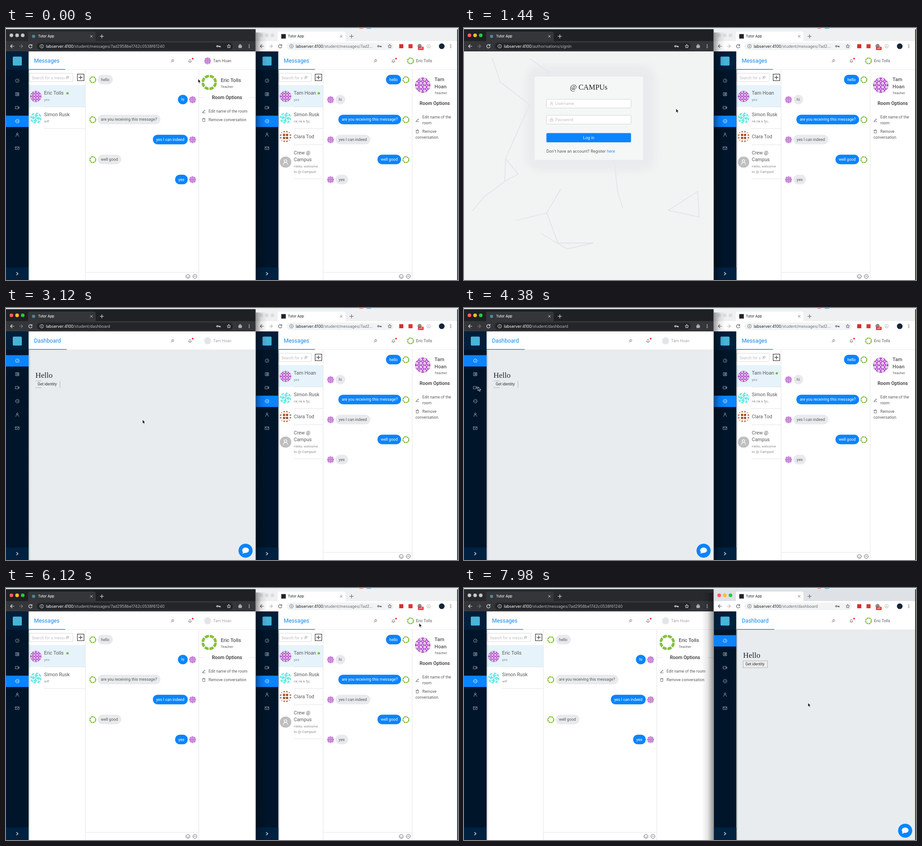
Animation, 1000 px wide and 560 px high, one loop 8 s. Source, as an HTML page:

```html
<!DOCTYPE html>
<html lang="en">
<head>
<meta charset="utf-8">
<title>Chat demo</title>
<style>
html, body { margin: 0; width: 100%; height: 100%; overflow: hidden; background: #fff; }
svg { display: block; font-family: Roboto, sans-serif; }
text { white-space: pre; }
.ui { font-family: Inter, sans-serif; }
.serif { font-family: "Liberation Serif", serif; }
</style>
</head>
<body>
<svg id="stage" width="1000" height="560" viewBox="0 0 1000 560"></svg>
<script>
const LOOP = 8000, STEP = 60, RIGHT = 552.5, BLUE = '#0a84ff';
const ME = 'Tam Hoan', PEER = 'Eric Tolls', HOST = 'labserver:4100';

// Page changes and window focus
const OUT_L = 780, IN_L = 2640, CHAT_L = 5700, OUT_R = 6600, IN_R = 7620;
const FOCUS_L = 480, FOCUS_R = 6300;

const ICONS = {
  dash: 'M-3 3A4 4 0 1 1 3 3ZM0 .8L1.5-1.3',
  list: 'M-3.5-3.5H3.5V3.5H-3.5ZM-1.5-1.5H2M-1.5 0H2M-1.5 1.5H2',
  video: 'M-4-2.7H2V2.7H-4ZM2-.5L4-2V2L2 .5',
  chat: 'M-4 0A4 4 0 1 1 4 0 4 4 0 1 1-4 0M-2.2 0h.8M-.4 0h.8M1.4 0h.8',
  user: 'M-1.9-1.8A1.9 1.9 0 1 1 1.9-1.8 1.9 1.9 0 1 1-1.9-1.8M-3.3 4C-3-.8 3-.8 3.3 4',
  mail: 'M-4-3H4V3H-4ZM-4-2.5L0 .8 4-2.5',
  search: 'M-1.2-.8A2.2 2.2 0 1 1 3.2-.8 2.2 2.2 0 1 1-1.2-.8M-.6 1L-3 3.2',
  bell: 'M-3 2.2C-2 1.5-2.2-3 0-3S2 1.5 3 2.2ZM-.8 3.6H.8',
  pen: 'M-3.5 3.7H3.5M-2.5 1.8L2-3 3.2-1.8-1.2 2Z',
  trash: 'M-3.2-2.5H3.2M-2.4-2.5V3.5H2.4V-2.5M-1.2-2.5V-3.6H1.2V-2.5',
  lock: 'M-3-.5H3V3.5H-3ZM-1.8-.5V-2A1.8 1.8 0 0 1 1.8-2V-.5M0 1v1',
  back: 'M4 0H-3.5M0-3.5L-3.5 0 0 3.5',
  next: 'M-4 0H3.5M0-3.5L3.5 0 0 3.5',
  reload: 'M3-2A3.7 3.7 0 1 0 3.6 1M3.6-4V-1.5H1',
  info: 'M-4 0A4 4 0 1 1 4 0 4 4 0 1 1-4 0M0-.5V2M0-2v.5',
  key: 'M-4 0A1.6 1.6 0 1 1-.8 0 1.6 1.6 0 1 1-4 0M-.8 0H4V2M2.2 0V1.6',
  star: 'M0-4L1.2-1.3 4-1 1.9.9 2.5 3.8 0 2.3-2.5 3.8-1.9.9-4-1-1.2-1.3Z',
  hat: 'M-4-.3H4M-2.3-.8L-1.5-3.5H1.5L2.3-.8ZM-3 2.2A1.2 1.2 0 1 1-.6 2.2 1.2 1.2 0 1 1-3 2.2M.6 2.2A1.2 1.2 0 1 1 3 2.2 1.2 1.2 0 1 1 .6 2.2',
  dots: 'M0-3v.1M0 0v.1M0 3v.1',
  chev: 'M-1.8-3L1.8 0-1.8 3',
  cross: 'M-2.3-2.3L2.3 2.3M2.3-2.3L-2.3 2.3',
  plus: 'M-4 0H4M0-4V4',
  smile: 'M-4.5 0A4.5 4.5 0 1 1 4.5 0 4.5 4.5 0 1 1-4.5 0M-2.3 1C-1.5 3 1.5 3 2.3 1M-1.7-1.5v.3M1.7-1.5v.3',
  up: 'M-4.5 0A4.5 4.5 0 1 1 4.5 0 4.5 4.5 0 1 1-4.5 0M-2.2 1L0-1.3 2.2 1'
};

const rect = (x, y, w, h, fill, more = '') => `<rect x="${x}" y="${y}" width="${w}" height="${h}" fill="${fill}" ${more}/>`;
const circle = (x, y, r, fill, more = '') => `<circle cx="${x}" cy="${y}" r="${r}" fill="${fill}" ${more}/>`;
const text = (x, y, s, size = 8.75, fill = '#595959', more = '') => `<text x="${x}" y="${y}" font-size="${size}" fill="${fill}" ${more}>${s}</text>`;
const path = (d, stroke, w = 1, more = '') => `<path d="${d}" stroke="${stroke}" stroke-width="${w}" fill="none" ${more}/>`;
const icon = (name, x, y, color = '#666', w = .9) => path(ICONS[name], color, w, `transform="translate(${x} ${y})" stroke-linecap="round"`);
const face = (id, x, y, r) => `<use href="#${id}" x="${x - r}" y="${y - r}" width="${2 * r}" height="${2 * r}"/>`;
const line = (x1, y1, x2, y2, color = '#e4e4e6') => path(`M${x1} ${y1}L${x2} ${y2}`, color);
const MID = 'text-anchor="middle"';

const pen = document.createElement('canvas').getContext('2d');
function textWidth(s) {
  pen.font = '8.75px Roboto, sans-serif';
  return pen.measureText(s).width;
}

// Geometric avatars on a 20 x 20 field, and shadow gradients
function makeDefs() {
  const grid = (at, f) => at.map(y => at.map(x => f(x, y)).join('')).join('');
  const diamond = (x, y, r) => `M${x - r} ${y}L${x} ${y - r} ${x + r} ${y} ${x} ${y + r}Z`;
  const symbol = (id, body) => `<symbol id="${id}" viewBox="-10 -10 20 20">${body}</symbol>`;
  const clip = body => `<g clip-path="url(#round)">${body}</g>`;
  const spin = d => [0, 90, 180, 270].map(a => `<path d="${d}" transform="rotate(${a})"/>`).join('');
  const fade = (id, stops) => `<linearGradient id="${id}">` +
    stops.map((o, i) => `<stop offset="${i / (stops.length - 1)}" stop-opacity="${o}"/>`).join('') + '</linearGradient>';
  const at = [-7.5, -2.5, 2.5, 7.5];
  return '<defs><clipPath id="round"><circle r="10"/></clipPath>' +
    fade('fade', [.22, 0]) + fade('onLeft', [0, .1, .4]) + fade('onRight', [.4, .1, 0]) +
    symbol('peer', circle(0, 0, 8, 'none', 'stroke="#86bf40" stroke-width="4" stroke-dasharray="5.2 1.083" transform="rotate(4)"') +
      `<path d="${[0, 1, 2, 3, 4, 5, 6, 7].map(i => 'ML'[+(i > 0)] + 7 * Math.cos(i * Math.PI / 4) + ' ' + 7 * Math.sin(i * Math.PI / 4)).join('')}Z" fill="#fff"/>`) +
    symbol('me', clip(circle(0, 0, 10, '#b04fc6') +
      `<path fill="#fff" d="${grid(at, (x, y) => diamond(x, y, 2))}"/><path fill="#b04fc6" d="${grid(at, (x, y) => diamond(x, y, .8))}"/>` +
      `<path fill="#fff" d="${grid([-5, 0, 5], (x, y) => diamond(x, y, 1))}"/>`)) +
    symbol('cyan', clip(circle(0, 0, 10, '#6ceae4') +
      `<g fill="#fff">${spin('M0 0L5-2 4-5ZM1-6L6-9 5-5ZM6-1L10-4V1ZM-5-5L-1-9-2-5Z')}</g>`)) +
    symbol('brown', clip(circle(0, 0, 10, '#fff') +
      `<g fill="#a04c22">${spin('M.7.7H4.5V4.5H.7ZM-4-10H-1L-2.5-6ZM1-10H4L2.5-6ZM5.5-5.5L9-7 7-9Z')}</g>`)) +
    symbol('blank', circle(0, 0, 10, '#bfbfbf') + path(ICONS.user, '#fff', .9, 'transform="scale(1.15)"')) + '</defs>';
}

function browser(x, dark, focus, route) {
  const c = dark ? '#e8eaed' : '#5a5d61', bar = dark ? '#35363a' : '#fff';
  const idle = dark ? '#c6c6c8' : '#dcdcde';
  const strip = dark ? (focus ? '#1f2023' : '#28292c') : (focus ? '#dee1e6' : '#eff0f1');
  const lights = focus ? ['#ff5f57', '#ffbd2e', '#28c940'] : [idle, idle, idle];
  const end = dark ? 552 : 998;
  let s = rect(x, 2.5, end - x, 27, strip);
  lights.forEach((f, i) => s += circle(x + 12 + 12.5 * i, 16.3, 4, f));
  s += rect(x + 49, 8, 149.5, 30, bar, 'rx="4"') + rect(x, 29, end - x, 23, bar);
  s += dark ? circle(61, 18.5, 3.6, '#4d8799') : rect(x + 56.5, 13.5, 10, 10, '#20232a');
  s += text(x + 71, 21.3, 'Tutor App', 7.6, dark ? '#f1f1f2' : '#3c4043', 'class="ui" font-weight="500"');
  s += icon('cross', x + 189, 18.5, c) + icon('plus', x + 212, 18.5, c, 1.1);
  s += icon('back', x + 13.5, 40.5, c, 1.2) + icon('next', x + 33.5, 40.5, dark ? '#77797d' : '#b4b6b9', 1.2) + icon('reload', x + 54, 40.5, c, 1.2);
  s += rect(x + 68, 32.5, (dark ? 502 : 858) - x - 68, 16.5, dark ? '#242528' : '#f1f3f4', 'rx="8.2"') + icon('info', x + 79, 40.5, c);
  s += text(x + 88.5, 43.7, `<tspan fill="${dark ? '#fff' : '#222'}">${HOST}</tspan>${route}`, 8.7, dark ? '#b5b7ba' : '#6d7074', 'class="ui"');
  s += icon('key', dark ? 470 : 826, 40.5, c, 1.3) + icon('star', dark ? 493 : 849, 40.5, c, 1) + icon('dots', dark ? 538 : 984, 40.5, c, 1.9);
  if (dark) return s + icon('hat', 518, 40.5, c, 1.1);
  return s + rect(870, 36, 9, 9, '#c8372d') + rect(890.5, 36, 9, 9, '#d23b33') + circle(915, 40, 4.7, '#8b8e92') +
    rect(911.5, 41.5, 12.5, 7.5, '#e5372c', 'rx="1.5"') + text(917.8, 47.4, 'off', 6, '#fff', MID) +
    circle(935, 40.5, 4, 'none', 'stroke="#aaa" stroke-width=".8"') + text(935, 42.7, 'A', 5.8, '#999', MID) + circle(964, 40.5, 6.3, '#17253a');
}

function frame(x, active, title, dim) {
  const left = x === 0, end = left ? 552 : 998, nav = ['dash', 'list', 'video', 'chat', 'user', 'mail'];
  let s = rect(x, 52, 50, 508, '#001529') + rect(x, 52, 50, 41, '#001f3a') + rect(x, 532, 50, 28, '#002140');
  s += rect(x + 15, 63.5, 20, 20, '#48b4d8', 'rx="2"') + rect(x, 104.8, 50, 25.2, BLUE);
  s = s.replace('y="104.8"', `y="${104.8 + 30 * active}"`);
  nav.forEach((n, i) => s += icon(n, x + 25, 117 + 30 * i, i === active ? '#fff' : '#a5adb8'));
  s += icon('chev', x + 25, 546, '#fff', 1.1);
  s += rect(x + 50, 52, end - x - 50, 41, '#fff') + line(x + 50, 92.5, end, 92.5, '#ececee');
  s += rect(x + 50, 91.3, active ? 81 : 84, 1.4, BLUE) + text(x + 62, 77, title, 12.3, '#1686ec');
  const [find, bell, user] = left ? [368, 407, 446] : [817, 857, 895];
  s += icon('search', find, 73) + icon('bell', bell, 72.7) + circle(bell + 6, 68, 2, '#f0393f');
  s += dim ? circle(user, 73, 7.7, '#e4e5e9') : face(left ? 'me' : 'peer', user, 73, 7.7);
  s += text(user + 12.3, 76.3, left ? ME : PEER, 8.8, dim ? '#a5a5a8' : '#595959');
  return s + rect(x + 50, 93, 4, 467, 'url(#fade)');
}

function person(x, id, cy, names, subs, end) {
  let y = cy + 9.5 - 6 * names.length - 7.5 * subs.length, s = face(id, x + 16, cy, 12.6);
  names.forEach((n, i) => s += text(x + 34.3, y + 15.5 * i, n, 10.7));
  y += 15.5 * (names.length - 1) + 14;
  subs.forEach((n, i) => s += text(x + 34.3, y + 12 * i, n, 7.9, '#8c8c8c'));
  const bottom = cy + (names.length > 1 ? 37 : subs.length ? 23.5 : 18.5);
  return s + line(x + 34, bottom, end, bottom);
}

function chat(x, online, dim) {
  const left = x === 0, px = x + 50, end = left ? 552 : 998;
  const [listEnd, panel] = left ? [175.5, 426.5] : [701.5, 898.5];
  const other = left ? 'peer' : 'me', self = left ? 'me' : 'peer';
  const box = left ? 97 : 72, mag = px + box - 11.5;
  let s = rect(px, 93, end - px, 467, '#fff');
  s += rect(px + 1, 100.5, box, 18.5, '#fff', 'stroke="#d9d9d9" rx="2"');
  s += `<svg x="${px + 7}" y="101" width="${box - 24}" height="18">${text(0, 12.5, 'Search for a message', 8.75, '#bfbfbf')}</svg>`;
  s += icon('search', mag, 110, '#888') + rect(listEnd - 17.5, 102.5, 14.5, 14.5, '#fff', 'stroke="#333" stroke-width="1.2"') + icon('plus', listEnd - 10.3, 109.8, '#333', 1.2);
  s += rect(px, 127, listEnd - px, 48.5, '#e6f3fa') + person(px, 'me', 152, [left ? PEER : ME], ['yes'], listEnd);
  if (online) s += circle(left ? 136 : 692, 145, 2.6, '#74bb36');
  s += person(px, 'cyan', 200, ['Simon Rusk'], [left ? 'wtf' : 'nk nk k fjc,'], listEnd);
  if (!left) s += person(px, 'brown', 241, ['Clara Tod'], [], listEnd) + person(px, 'blank', 298, ['Crew @', 'Campus'], ['Hello, welcome', 'to @ Campus!'], listEnd);
  s += line(listEnd, 93, listEnd, 560) + line(panel, 93, panel, 560);

  ['hello', 'hi', 'are you receiving this message?', 'yes I can indeed', 'well good', 'yes'].forEach((m, i) => {
    const y = 114.5 + 44.4 * i, w = textWidth(m) + 14.8, mine = (i % 2 === 1) === left;
    const bx = mine ? panel - 24.4 - w : listEnd + 27.3;
    s += rect(bx, y - 10.5, w, 21.2, mine ? BLUE : '#e9eaed', 'rx="10.3"') + text(bx + 7.3, y + 3, m, 8.75, mine ? '#fff' : '#595959');
    s += face(mine ? self : other, mine ? panel - 13.7 : listEnd + 16.5, y + .5, 7.8);
  });
  s += line(listEnd, 543, panel, 543) + icon('smile', panel - 24, 552, '#555') + icon('up', panel - 8.5, 552, '#555');

  const bold = 'font-weight="500" ';
  if (left) {
    s += face(other, 449.5, 121, 17) + text(475, 119.7, PEER, 11.2, '#555', bold) + text(475, 132.5, 'Teacher', 7.8);
    s += line(427, 154.5, 440, 154.5) + line(538, 154.5, 552, 154.5) + text(489, 158.2, 'Room Options', 10.5, '#333', bold + MID);
    s += icon('pen', 437.5, 185) + text(448, 188, 'Edit name of the room') + icon('trash', 437.5, 204.3) + text(448, 207.3, 'Remove conversation');
  } else {
    const [first, last] = ME.split(' ');
    s += face(other, 922, 127, 17) + text(948, 117.7, first, 11.2, '#555', bold) + text(948, 134.2, last, 11.2, '#555', bold) + text(948, 147, 'Teacher', 7.8);
    s += text(948.5, 171, 'Room Options', 10.5, '#333', bold + MID);
    s += icon('pen', 910, 204.5) + text(921, 200.7, 'Edit name of the') + text(921, 213.7, 'room');
    s += icon('trash', 910, 230) + text(921, 233.3, 'Remove') + text(906, 246.3, 'conversation');
  }
  return s + frame(x, 3, 'Messages', dim);
}

function dashboard(x, dim) {
  const end = x ? 998 : 552, bx = x + 530 - (x ? 106.5 : 0);
  let s = rect(x + 50, 93, end - x - 50, 467, '#e9ecef') + text(x + 65, 154.8, 'Hello', 17.2, '#222', 'class="serif"');
  s += x ? rect(x + 65, 162, 54, 15, '#ededee', 'stroke="#aaa" stroke-width=".9"')
    : path('M65 162H79M65 177H79M119.5 162V177', '#aaa', .9);
  s += text(x + 70, 172.3, 'Get identity', 8.4, '#333');
  s += circle(bx, 539.3, 15.6, BLUE) + `<ellipse cx="${bx}" cy="538.3" rx="7.5" ry="6" fill="#fff"/><path d="M${bx - 5.5} 541l-1.5 5 6-2z" fill="#fff"/>`;
  return s + frame(x, 0, 'Dashboard', dim);
}

const MESH_L = ['62,66 80,120 145,170 92,290 120,325 90,341 92,290', '90,341 45,375 18,407', '145,68 188,98 182,125', '214,358 183,411 208,478 286,478 228,491 170,456', '183,411 115,428', '332,290 340,365 351,400', '452,405 517,363 520,420 452,405'];
const MESH_R = ['553,138 617,155 632,128 616,68', '560,136 600,212 625,150 665,100 616,68', '607,368 603,392', '820,230 838,375', '868,240 920,306 950,348 965,340', '880,165 908,155 990,72', '700,540 712,535 765,535 735,551 700,540'];

function mesh(list, dt) {
  let n = 0;
  return list.map(p => {
    const pts = p.split(' ').map(q => {
      const [x, y] = q.split(',').map(Number), a = ++n * 2.4;
      return `${x + dt * .006 * Math.sin(a)},${y + dt * .006 * Math.cos(a)}`;
    });
    return `<polyline points="${pts.join(' ')}" fill="none" stroke="#dfe6ec" stroke-width="1.8"/>`;
  }).join('');
}

function signIn(x, t, filled) {
  const end = x ? 998 : 552, [cx, cy, w] = x ? [630.5, 120, 290] : [156, 108, 240];
  const ix = cx + 26.3, iw = w - 52.8, mid = cx + w / 2;
  const field = (y, name, hint, value) => rect(ix, y, iw, 19.5, filled ? '#faffbd' : '#fff', 'stroke="#d2d3d5" rx="2"') +
    icon(name, ix + 11.5, y + 9.8, '#b5b5b5', .8) +
    text(ix + 19.5, y + 13, filled ? value : hint, 8.6, filled ? '#111' : '#bfbfbf', 'class="ui"');
  return rect(x, 52, end - x, 508, '#f2f3f3') + mesh(x ? MESH_R : MESH_L, t - (x ? 7140 : 1440)) +
    rect(cx - 20, cy - 27, w + 48, 238, '#e6e9ec', 'rx="34" style="filter:blur(7px)" opacity=".7"') + rect(cx, cy, w, 185, '#f5f6f6', 'rx="2"') +
    text(mid, cy + 29, '@ CAMPUs', 16.2, '#222', 'class="serif" ' + MID) +
    field(cy + 50.3, 'user', 'Username', 'hoatam') + field(cy + 86, 'lock', 'Password', '•••••••••') +
    rect(ix, cy + 125.6, iw, 20.4, BLUE, 'rx="2"') + text(mid, cy + 139, 'Log in', 8.6, '#fff', 'class="ui" ' + MID) +
    text(ix, cy + 169, `Don't have an account? Register <tspan fill="#1890ff">here</tspan>`, 8.6, '#555', 'class="ui"');
}

// Pointer path: time, x, y
const PATH = [[0, 425, 113], [360, 470, 75], [540, 470, 75], [720, 470, 108], [840, 470, 108], [1260, 469, 179], [1620, 469, 179],
  [1920, 250, 168], [2160, 250, 168], [2400, 302, 243], [2640, 302, 243], [2760, 302, 248], [3120, 302, 248], [3420, 120, 165], [4200, 31, 150],
  [4560, 31, 200], [5760, 31, 200], [6060, 914, 78], [6300, 914, 78], [6480, 914, 108], [6600, 914, 108], [6960, 761, 248], [7560, 761, 248], [7740, 761, 255], [8000, 761, 255]];

function pointer(t) {
  const i = PATH.findIndex(k => k[0] > t), [t0, x0, y0] = PATH[i - 1], [t1, x1, y1] = PATH[i];
  const u = (t - t0) / (t1 - t0), e = u * u * (3 - 2 * u), x = x0 + (x1 - x0) * e, y = y0 + (y1 - y0) * e;
  const hand = [[2340, IN_L], [4500, CHAT_L], [6900, IN_R]].some(([a, b]) => t >= a && t < b);
  const [d, fill, edge] = hand
    ? ['M-1.2 1Q0-.5 1 1L1.5 4 5 5Q6 5.5 5.5 8L4.8 10H0L-3 6.5Q-2.5 5-.5 6.5Z', '#fff', '#111']
    : ['M0 0V9L2 7.2 3.4 10.3 4.9 9.6 3.5 6.7H6.3Z', '#111', '#fff'];
  return `<path d="${d}" fill="${fill}" stroke="${edge}" stroke-width=".8" transform="translate(${x} ${y})"/>`;
}

function scene(t) {
  const routes = { chat: '/student/messages/7ad2958be1742c0538f61240', sign: '/authorisations/signin', dash: '/student/dashboard' };
  const pageL = t < OUT_L ? 'chat' : t < IN_L ? 'sign' : t < CHAT_L ? 'dash' : 'chat';
  const pageR = t < OUT_R ? 'chat' : t < IN_R ? 'sign' : 'dash';
  const dim = t >= IN_L, rightOnTop = t >= FOCUS_R;
  const show = (page, x, online, dim, filled) => page === 'chat' ? chat(x, online, dim) : page === 'sign' ? signIn(x, t, filled) : dashboard(x, dim);
  let s = rect(0, 0, 1000, 560, '#e4eef2') + rect(782, 0, 8, 1.5, '#e58a80') + rect(798, 0, 10, 1.5, '#7d9fc9') + rect(998, 3, 2, 557, '#34414f');
  s += show(pageL, 0, t < OUT_R, dim, t >= 2100) + browser(0, true, t >= FOCUS_L && !rightOnTop, routes[pageL]);
  s += show(pageR, RIGHT, t < OUT_L || t >= 3540, false, true);
  s += browser(RIGHT, false, rightOnTop, pageR === 'chat' ? routes.chat.slice(0, 22) + '...' : routes[pageR]);
  // The front window casts its shadow on the other one
  s += rightOnTop ? rect(526, 10, 26, 550, 'url(#onLeft)') : rect(552, 10, 26, 550, 'url(#onRight)');
  s += line(552.3, 3, 552.3, 560, '#8b8d92');
  if (t >= 4560 && t < CHAT_L) s += rect(57, 198, 50.5, 19.7, '#37393c', 'rx="2.5"') + '<path d="M57 204.5L53.5 207.8 57 211Z" fill="#37393c"/>' + text(62, 211, 'Messages', 8.75, '#fff');
  return s + pointer(t);
}

const stage = document.getElementById('stage'), defs = makeDefs();
let shown = -1;
function tick() {
  const t = Math.floor(performance.now() % LOOP / STEP) * STEP;
  if (t !== shown) stage.innerHTML = defs + scene(shown = t);
  requestAnimationFrame(tick);
}
tick();
</script>
</body>
</html>
```
